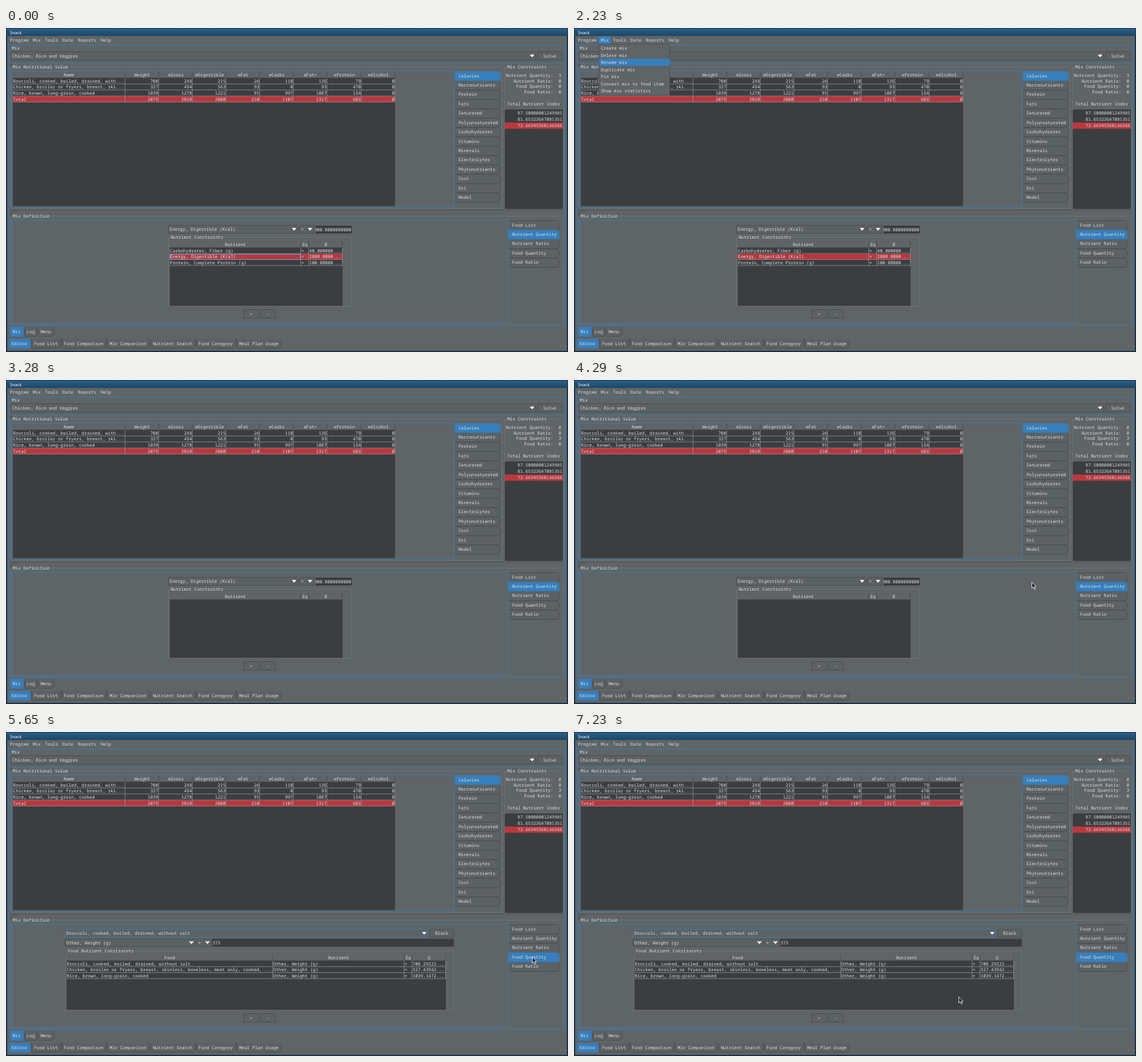
These frames come from a looping animation (985 by 569 pixels, 9.74 s). An HTML page:

```html
<!DOCTYPE html>
<html lang="en">
<head>
<meta charset="utf-8">
<title>Snack</title>
<style>
  html, body { margin: 0; width: 100%; height: 100%; overflow: hidden; background: #14304c; }
  svg { display: block; width: 985px; height: 569px; }
  text { font: 7.7px "Noto Sans Mono", "DejaVu Sans Mono", monospace; fill: #dcdedf;
         text-rendering: geometricPrecision; white-space: pre; }
  .title { font: 7.4px "Noto Sans", sans-serif; fill: #fff; }
</style>
</head>
<body>
<svg id="stage" viewBox="0 0 985 569" xmlns="http://www.w3.org/2000/svg"></svg>
<script>
const C = { bg: '#5f6467', tab: '#5c6164', dark: '#3b3e41', blue: '#377fbc', red: '#b8373f',
            edge: '#484d50', light: '#6d7275', grid: '#85898c', rim: '#397bb0' };
const LOOP = 9740;

// Markup helpers; y of a text is the middle of its line.
const text = (x, y, s, anchor = 'start', extra = '') =>
  `<text x="${x}" y="${y + 2.6}" text-anchor="${anchor}" ${extra}>${s}</text>`;
const rect = (x1, y1, x2, y2, fill, extra = '') =>
  `<rect x="${x1}" y="${y1}" width="${x2 - x1}" height="${y2 - y1}" fill="${fill}" ${extra}/>`;
const frame = (x1, y1, x2, y2, color, r = 0, fill = 'none') =>
  rect(x1 + .5, y1 + .5, x2 - .5, y2 - .5, fill, `rx="${r}" stroke="${color}"`);
const line = (x1, y1, x2, y2, color) =>
  `<path d="M${x1} ${y1}L${x2} ${y2}" stroke="${color}"/>`;
const group = (id, body) => `<g id="${id}">${body}</g>`;
const arrow = (x, y) => `<path d="M${x - 4} ${y - 2.2}h8l-4 4.6z" fill="#fff"/>`;

const button = (x1, y1, x2, y2, label) =>
  frame(x1, y1, x2, y2, C.edge, 1.5, C.tab) + text((x1 + x2) / 2, (y1 + y2) / 2, label, 'middle');

const combo = (x1, y1, x2, y2, label, border = C.edge) =>
  frame(x1, y1, x2, y2, border, 1.5, C.tab) +
  text(x1 + 2.8, (y1 + y2) / 2, label) + arrow(x2 - 7, (y1 + y2) / 2);

const sideTab = (x1, x2, y, label, on) =>
  `<path d="M${x1} ${y + .4}H${x2 - 4.5}L${x2 - .5} ${y + 4.4}V${y + 14.6}L${x2 - 2.5} ${y + 16.6}H${x1}"
    fill="${on ? C.blue : C.tab}" stroke="${on ? C.rim : C.edge}"/>` + text(x1 + 6, y + 8, label);

// The selected tab is drawn last so that it covers its neighbours' edges.
function sideTabs(x1, x2, y, labels, selected) {
  const tab = i => sideTab(x1, x2, y + i * 16.43, labels[i], i === selected);
  return labels.map((_, i) => i === selected ? '' : tab(i)).join('') + tab(selected);
}

const bottomTab = (y1, y2) => ([x1, x2, label, on]) =>
  `<path d="M${x1 + .5} ${y1}V${y2 - 2.5}L${x1 + 2.5} ${y2 - .5}H${x2 - 4}L${x2 - .5} ${y2 - 4}V${y1}"
    fill="${on ? C.blue : C.tab}" stroke="${on ? C.rim : C.edge}"/>` + text(x1 + 4.5, (y1 + y2) / 2, label);

function tableHead(edges, y1, y2, bottom, heads) {
  const end = edges.at(-1);
  return rect(edges[0], y2, end, bottom, C.dark) +
    heads.map((s, i) => text((edges[i] + edges[i + 1]) / 2, (y1 + y2) / 2 + .5, s, 'middle') +
      line(edges[i + 1] - .5, y1, edges[i + 1] - .5, y2, C.edge)).join('') +
    line(edges[0], y2 - .5, end, y2 - .5, C.edge);
}

function tableRows(edges, top, rows, selected, numeric) {
  const pitch = 10.55, end = edges.at(-1);
  return rows.map((row, r) => {
    const y = top + r * pitch, bottom = y + pitch;
    return (r === selected ? rect(edges[0], y, end, bottom, C.red) : '') +
      row.map((s, c) => numeric && c
        ? text(edges[c + 1] - 1.2, y + 5.1, s, 'end')
        : text(edges[c] + .6, y + 5.1, s)).join('') +
      line(edges[0], bottom - .5, end, bottom - .5, C.grid) +
      edges.slice(1).map(x => line(x - .5, y, x - .5, bottom, C.grid)).join('');
  }).join('');
}

const groupBox = (x1, y1, x2, y2, title) =>
  frame(x1, y1, x2, y2, C.light) + rect(x1 + 3, y1 - 1, x1 + 7 + title.length * 4.62, y1 + 2, C.bg) +
  text(x1 + 4.5, y1, title);

function windowFrame() {
  const menus = [[7, 'Program'], [47, 'Mix'], [68.5, 'Tools'], [99, 'Data'], [126, 'Reports'], [166, 'Help']];
  return `<defs><linearGradient id="bar" x2="0" y2="1"><stop stop-color="#2c5f84"/>
    <stop offset="1" stop-color="#1c4767"/></linearGradient>
    <clipPath id="field"><path d="M542 346h64v15h-64z"/></clipPath></defs>` +
    rect(0, 0, 985, 569, '#14304c') + rect(1, 1, 984, 14, 'url(#bar)') + rect(2, 14, 983, 567, C.bg) +
    text(7, 8, 'Snack', 'start', 'class="title"') + rect(43, 15, 64, 28, C.blue, 'id="menuMark"') +
    menus.map(([x, s]) => text(x, 21, s)).join('');
}

function upperPane() {
  const edges = [12, 209, 268, 327, 386, 445, 504, 563, 623, 682];
  const heads = ['Name', 'Weight', 'eGross', 'eDigestible', 'eFat', 'eCarbs', 'eFat+', 'eProtein', 'eAlcohol'];
  const rows = [
    ['Broccoli, cooked, boiled, drained, with...', 708, 248, 215, 26, 110, 136, 79, 0],
    ['Chicken, broiler or fryers, breast, ski...', 327, 494, 563, 93, 0, 93, 470, 0],
    ['Rice, brown, long-grain, cooked', 1039, 1278, 1221, 91, 997, 1087, 134, 0],
    ['Total', 2075, 2020, 2000, 210, 1107, 1317, 683, 0]];
  const views = ['Calories', 'Macronutrients', 'Protein', 'Fats', 'Saturated', 'Polyunsaturated', 'Carbohydrates',
    'Vitamins', 'Minerals', 'Electrolytes', 'Phytonutrients', 'Cost', 'Dri', 'Model'];
  const index = ['87.50000001249985', '81.65323647081351', '73.66949360146586'];
  return frame(5, 29, 980, 524, C.rim, 1) + text(10, 35, 'Mix') +
    combo(8, 41, 929, 57, 'Chicken, Rice and Veggies') + button(931, 41, 975, 57, 'Solve') +
    line(8, 62.5, 979, 62.5, C.rim) + line(8.5, 62, 8.5, 521, C.edge) +
    frame(8, 68, 869, 318, C.light) + rect(11, 66, 111, 70, C.bg) + text(12, 68, 'Mix Nutritional Value') +
    frame(10, 75, 786, 315, C.rim) +
    tableHead(edges, 76, 88, 313, heads) + tableRows(edges, 88.2, rows, 3, true) +
    sideTabs(787, 867, 76, views, 0) +
    frame(873, 68, 978, 319, C.light) + rect(876, 66, 950, 70, C.bg) + text(878.5, 68, 'Mix Constraints') +
    ['Nutrient Quantity:', 'Nutrient Ratio:', 'Food Quantity:', 'Food Ratio:']
      .map((s, i) => text(959, 83 + i * 9.9, s, 'end') + text(973, 83 + i * 9.9, 0, 'end', `id="count${i}"`)).join('') +
    text(878.5, 133.5, 'Total Nutrient Index') + rect(874, 143, 976, 318, C.dark) +
    rect(874, 166, 976, 177, C.red) +
    index.map((s, i) => text(975, 149 + i * 11.2, s, 'end')).join('') +
    line(8, 319.5, 977, 319.5, C.edge) +
    `<path d="M10 323l3-3 3 3zM16 320h6l-3 3z" fill="none" stroke="${C.edge}" stroke-width=".5"/>`;
}

function nutrientPane() {
  const edges = [287, 517, 531, 590];
  const rows = [['Carbohydrates, Fiber (g)', '=', '40.000000...'],
    ['Energy, Digestible (Kcal)', '=', '2000.0000...'], ['Protein, Complete Protein (g)', '=', '100.00000...']];
  return combo(284, 346, 512, 361, 'Energy, Digestible (Kcal)') + combo(514, 346, 540, 361, '=') +
    rect(542, 347, 606, 361, C.dark) +
    `<g clip-path="url(#field)">${text(605, 354, '2000.0000000000', 'end')}</g>` +
    groupBox(284, 367, 606, 489, 'Nutrient Constraints') +
    tableHead(edges, 374, 386, 488, ['Nutrient', 'Eq', 'B']) +
    group('nutrientRows', tableRows(edges, 386, rows, 1) +
      group('focus', frame(287, 397, 516, 407, '#6aa6d6')));
}

function foodPane() {
  const edges = [106, 468, 698, 712, 771], weight = 'Other, Weight (g)';
  const rows = [['Broccoli, cooked, boiled, drained, without salt', weight, '=', '708.29222...'],
    ['Chicken, broiler or fryers, breast, skinless, boneless, meat only, cooked, ...', weight, '=', '327.43942...'],
    ['Rice, brown, long-grain, cooked', weight, '=', '1039.1472...']];
  return combo(103, 346, 740, 361, rows[0][0], C.rim) + button(742, 346, 785, 361, 'Block') +
    combo(103, 363, 332, 377, weight) + combo(334, 363, 360, 377, '=') +
    rect(361, 363, 785, 377, C.dark) + text(362, 370.5, '375') +
    groupBox(104, 384, 785, 489, 'Food Nutrient Constraints') +
    tableHead(edges, 390, 402, 488, ['Food', 'Nutrient', 'Eq', 'Q']) + tableRows(edges, 402, rows);
}

function lowerPane() {
  const kinds = ['Food List', 'Nutrient Quantity', 'Nutrient Ratio', 'Food Quantity', 'Food Ratio'];
  return frame(8, 330, 977, 521, C.light) + rect(10, 328, 80, 332, C.bg) + text(12, 330, 'Mix Definition') +
    frame(10, 337, 880, 519, C.rim) +
    group('nutrients', nutrientPane() + sideTabs(881, 970, 338, kinds, 1)) +
    group('foods', foodPane() + sideTabs(881, 970, 338, kinds, 3)) +
    button(416, 494, 443, 510, '+') + button(446, 494, 473, 510, '-') +
    [[7, 31, 'Mix', true], [32, 55, 'Log'], [56, 85, 'Menu']].map(bottomTab(525, 542)).join('') +
    [[5, 43, 'Editor', true], [44.5, 96, 'Food List'], [97, 176, 'Food Comparison'], [177, 252, 'Mix Comparison'],
      [253, 332, 'Nutrient Search'], [333, 403, 'Food Category'], [404, 483, 'Meal Plan Usage']]
      .map(bottomTab(546, 563)).join('');
}

function mixMenu() {
  const items = ['Create mix', 'Delete mix', 'Rename mix', 'Duplicate mix', 'Pin mix',
    'Convert mix to food item', 'Show mix statistics'];
  return frame(43, 28, 168, 119, '#4a4f52', 0, C.bg) + rect(44, 29, 168, 41.5, C.blue, 'id="hover"') +
    items.map((s, i) => text(47, 35.5 + i * 12.5, s)).join('');
}

const stage = document.getElementById('stage');
stage.innerHTML = windowFrame() + upperPane() + lowerPane() + group('menu', mixMenu()) +
  group('pointer', '<path d="M.5 0V10.6L2.9 8.5 4.8 12.8 6.6 12 4.7 7.9H8Z" fill="#141c38" stroke="#fff" stroke-width=".9"/>');

const byId = id => document.getElementById(id);
const show = (id, on) => byId(id).setAttribute('display', on ? 'inline' : 'none');

const hoverTimes = [1980, 2100, 2200, 2330, 2470];
// Pointer stops: time, x, y.
const route = [[3850, 658, 318], [4300, 805, 356], [4750, 909, 391], [4830, 911, 391], [5150, 922, 395],
  [5650, 922, 395], [5920, 944, 406], [6180, 904, 415], [6430, 814, 431], [6590, 749, 461],
  [6630, 746, 462], [6900, 690, 468], [7080, 672, 468], [7230, 674, 465]];

function pointerAt(t) {
  const next = route.findIndex(p => p[0] > t);
  if (next < 0) return route.at(-1).slice(1);
  const [t0, x0, y0] = route[next - 1], [t1, x1, y1] = route[next];
  const k = (t - t0) / (t1 - t0);
  return [x0 + (x1 - x0) * k, y0 + (y1 - y0) * k].map(Math.round);
}

function draw(t) {
  const menuOpen = t >= 1340 && t < 3280, pinned = t >= 3280, foods = t >= 5320;
  const item = hoverTimes.filter(h => t >= h).length - 1;
  show('menu', menuOpen);
  show('menuMark', menuOpen);
  show('hover', item >= 0);
  byId('hover').setAttribute('y', 29 + Math.max(item, 0) * 12.5);
  show('focus', t < 1340);
  show('nutrientRows', !pinned);
  byId('count0').textContent = pinned ? 0 : 3;
  byId('count2').textContent = pinned ? 3 : 0;
  show('nutrients', !foods);
  show('foods', foods);
  show('pointer', t >= route[0][0]);
  if (t >= route[0][0]) byId('pointer').setAttribute('transform', `translate(${pointerAt(t)})`);
}

const start = performance.now();
function tick() {
  draw((performance.now() - start) % LOOP);
  requestAnimationFrame(tick);
}
tick();
</script>
</body>
</html>
```
